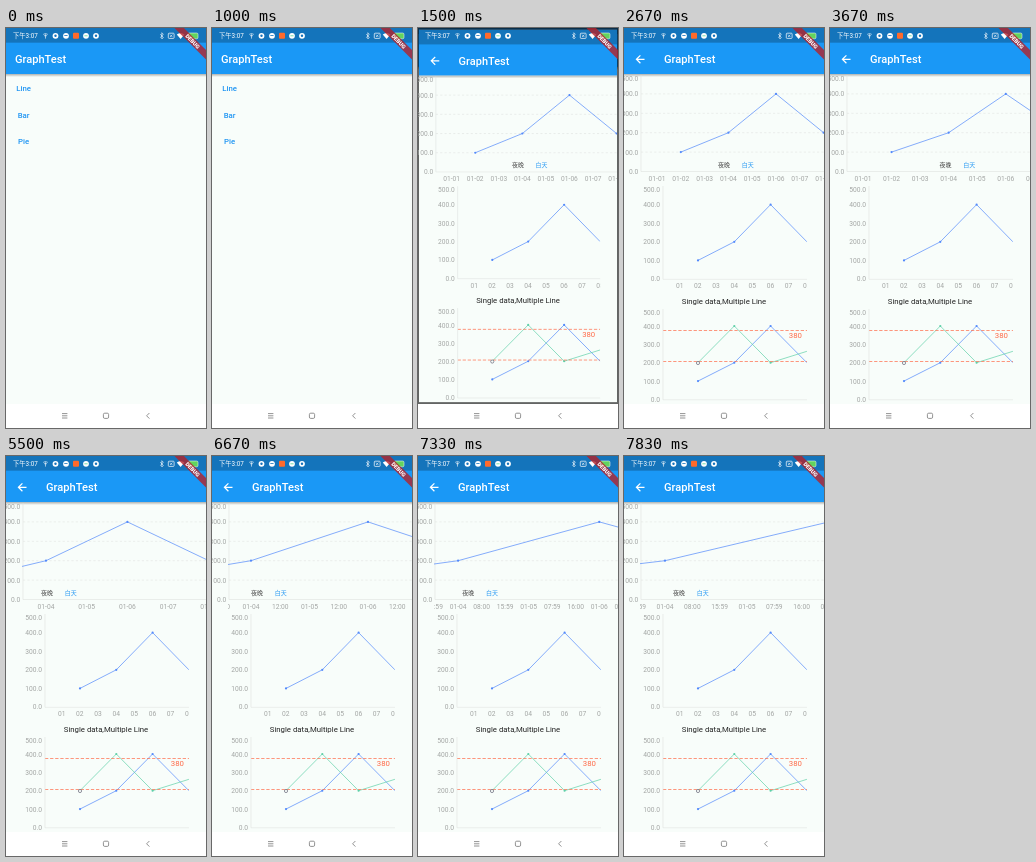
An HTML page for the animation above (8 s loop, 200x400 px).

```html
<!DOCTYPE html>
<html lang="en">
<head>
<meta charset="utf-8">
<title>Chart page</title>
<style>
  html, body { margin: 0; width: 100%; height: 100%; overflow: hidden; background: #fff; }
  svg { display: block; width: 100%; height: 100%; font-family: Roboto, "Noto Sans CJK SC", "Noto Sans CJK", sans-serif; }
</style>
</head>
<body>
<svg id="stage" viewBox="0 0 200 400">
  <defs>
    <clipPath id="screen"><rect width="200" height="376"/></clipPath>
    <clipPath id="scroll"><rect x="16" y="46" width="184" height="110"/></clipPath>
    <clipPath id="plot"><rect x="39" y="150" width="144" height="226"/></clipPath>
    <linearGradient id="shade" x2="0" y2="1">
      <stop stop-color="#000" stop-opacity=".3"/>
      <stop offset="1" stop-color="#000" stop-opacity="0"/>
    </linearGradient>
  </defs>
  <g clip-path="url(#screen)">
    <g id="home"></g>
    <rect id="scrim" width="200" height="376" opacity="0"/>
    <g id="page"></g>
  </g>
  <g id="system"></g>
</svg>
<script>
const $ = id => document.getElementById(id);
const BLUE = '#2196f3', LINE = '#5289fb', GREEN = '#5fd0a8', RED = '#ff6a48', GRAY = '#a3a6a4', RULE = '#dfe3e0';

function add(parent, tag, attrs, text) {
  const el = document.createElementNS('http://www.w3.org/2000/svg', tag);
  for (const k in attrs) el.setAttribute(k, attrs[k]);
  if (text !== undefined) el.textContent = text;
  return parent.appendChild(el);
}
// Text centred vertically on y
const label = (parent, text, x, y, size, fill, anchor = 'middle', weight = 400) =>
  add(parent, 'text', { x, y: y + size * 0.36, 'font-size': size, fill, 'text-anchor': anchor, 'font-weight': weight }, text);
const path = (parent, d, stroke, width = 0.7, more = {}) =>
  add(parent, 'path', { d, stroke, 'stroke-width': width, fill: 'none', ...more });
const dot = (parent, cx, cy, r, fill) => add(parent, 'circle', { cx, cy, r, fill });
const poly = pts => 'M' + pts.map(p => p.join(' ')).join('L');

function scaffold(g, titleX) {
  add(g, 'rect', { width: 200, height: 376, fill: '#f8fdfa' });
  add(g, 'rect', { y: 46, width: 200, height: 3, fill: 'url(#shade)' });
  add(g, 'rect', { width: 200, height: 46, fill: '#1a98f6' });
  add(g, 'rect', { width: 200, height: 14.7, opacity: 0.24 });
  label(g, 'GraphTest', titleX, 31.5, 11.1, '#fff', 'start', 500);
}

function yLabels(g, x, top, base, step) {
  for (let i = 0; i <= 5; i++)
    label(g, (i * 100).toFixed(1), x, Math.max(top, base - i * step), 6.7, GRAY, 'end');
}

function series(g, values, base, step, color) {
  const pts = values.map((v, i) => [74 + i * 36.3, base - v * step / 100]);
  path(g, poly(pts), color);
  pts.slice(0, 3).forEach(p => dot(g, ...p, 1.1, color));
}

// Home page
const home = $('home');
scaffold(home, 8.9);
['Line', 'Bar', 'Pie'].forEach((s, i) => label(home, s, 17.6, 60 + i * 26.7, 7.8, BLUE, 'middle', 500));

// Chart page
const page = $('page');
scaffold(page, 40);
path(page, 'M20.5 31.3H12.6M16.4 27.4L12.4 31.3L16.4 35.2', '#fff', 1.2);

const BASE = 143.5, STEP = 19.4;
yLabels(page, 14.3, 50.5, BASE, STEP);
for (let i = 1; i < 5; i++)
  path(page, `M17 ${BASE - i * STEP}H200`, RULE, 0.6, { 'stroke-dasharray': '2.2 2.2' });
path(page, `M17 47V${BASE}H200`, RULE, 0.6);
const pan = add(page, 'g', { 'clip-path': 'url(#scroll)' });
const curve = path(pan, '', LINE);
const data = [[1, 100], [3, 200], [5, 400], [7, 200]];
const dots = data.map(() => dot(pan, 0, 0, 1.1, LINE));
const ticks = Array.from({ length: 24 }, () => label(pan, '', 0, 150.3, 6.7, GRAY));
const legend = add(pan, 'g', {});
label(legend, '夜晚', 0, 136.6, 6, '#444');
label(legend, '白天', 23.8, 136.6, 6, BLUE);

yLabels(page, 36, 161.7, 251, 18.5);
path(page, 'M39 158V251.3H183', RULE, 0.6);
const plot = add(page, 'g', { 'clip-path': 'url(#plot)' });
for (let i = 1; i <= 8; i++) label(plot, '0' + i, 55.7 + (i - 1) * 18.15, 258, 6.7, GRAY);
series(plot, [100, 200, 400, 200], 251, 18.6, LINE);

label(page, 'Single data,Multiple Line', 100, 273, 7.8, '#222');

yLabels(page, 36, 284.7, 371.6, 18.3);
path(page, 'M39 281V371.8H183', RULE, 0.6);
series(plot, [100, 200, 400, 200], 371.4, 18.35, LINE);
series(plot, [200, 400, 200, 262], 371.4, 18.35, GREEN);
for (const y of [302.5, 333.5])
  path(plot, `M39 ${y}H183`, RED, 0.7, { 'stroke-dasharray': '3.3 1.8' });
add(plot, 'circle', { cx: 74, cy: 335, r: 1.6, fill: '#f8fdfa', stroke: '#667', 'stroke-width': 0.7 });
label(page, '380', 171.4, 307.2, 7.8, RED);

// System bars and debug banner
const sys = $('system');
label(sys, '下午3:07', 7, 7.8, 6.3, '#fff', 'start');
path(sys, 'M37.2 6.4Q39.5 4.6 41.8 6.4M38 7.7H41M39.5 6.2V10.6', '#fff', 0.6);
[49.5, 60, 80, 90].forEach(x => dot(sys, x, 7.8, 2.9, '#fff'));
dot(sys, 49.5, 7.8, 1.2, '#1673bb');
path(sys, 'M58.3 7.5H61.6', '#1673bb', 0.8);
path(sys, 'M78.4 7.8H81.6', '#7da', 1);
dot(sys, 90, 7.8, 1.2, '#1673bb');
add(sys, 'rect', { x: 67, y: 4.8, width: 6, height: 6, rx: 1, fill: '#ff6a2b' });
path(sys, 'M154.3 6L157.3 9.5L155.8 11V4.7L157.3 6.2L154.3 9.7', '#fff', 0.6);
add(sys, 'rect', { x: 162.3, y: 5.2, width: 5.8, height: 5.2, rx: 0.8, fill: 'none', stroke: '#fff', 'stroke-width': 0.7 });
path(sys, 'M164 6.6L166.4 9M166.4 6.6L164 9', '#fff', 0.6);
// Wifi fan
path(sys, 'M170.8 6.6Q174.6 3.4 178.4 6.6L174.6 11Z', 'none', 0, { fill: '#fff' });
add(sys, 'rect', { x: 182, y: 5, width: 10, height: 5.8, rx: 1.4, fill: '#62d45f', stroke: '#fff', 'stroke-width': 0.5 });

const banner = add(sys, 'g', { transform: 'translate(200 0) rotate(45)' });
add(banner, 'rect', { x: -24, y: 15.6, width: 48, height: 6.7, fill: '#b4222a', opacity: 0.8 });
label(banner, 'DEBUG', 0, 18.9, 5.6, '#fff', 'middle', 900);

add(sys, 'rect', { y: 376, width: 200, height: 24, fill: '#fff' });
path(sys, 'M56 385.6H61.4M56 387.8H61.4M56 390H61.4', '#777', 0.8);
add(sys, 'rect', { x: 97.4, y: 385.2, width: 5.2, height: 5.2, rx: 1.3, fill: 'none', stroke: '#777', 'stroke-width': 0.8 });
path(sys, 'M143.4 385L140.6 387.8L143.4 390.6', '#777', 0.8);

// time, x of day 01-04, pixels per day, legend x
const MOVES = [
  [0, 104.4, 23.8, 100],
  [3340, 104.4, 23.8, 100],
  [4500, 155, 40.7, 155],
  [4670, 155, 40.7, 155],
  [5500, 40, 40.7, 41],
  [5840, 39.5, 40.7, 41],
  [6667, 39, 58.5, 45],
  [7000, 39.5, 63, 47],
  [7834, 41, 82, 55],
  [8000, 41, 82, 55]
];

function sample(t) {
  const i = MOVES.findIndex(m => m[0] > t);
  const a = MOVES[i - 1], b = MOVES[i], f = (t - a[0]) / (b[0] - a[0]);
  return a.slice(1).map((v, k) => v + (b[k + 1] - v) * f);
}

function tickText(day, part, parts) {
  if (!part) return '01-0' + (day + 1);
  if (parts === 2) return '12:00';
  return (day < 4 ? ['08:00', '15:59'] : ['07:59', '16:00'])[part - 1];
}

function drawChart(t) {
  const [x3, scale, legendX] = sample(t);
  const at = day => x3 + (day - 3) * scale;
  const pts = data.map(([d, v]) => [at(d), BASE - v * STEP / 100]);
  curve.setAttribute('d', poly(pts));
  dots.forEach((el, i) => { el.setAttribute('cx', pts[i][0]); el.setAttribute('cy', pts[i][1]); });
  const parts = scale < 47 ? 1 : scale < 70 ? 2 : 3;
  ticks.forEach((el, i) => {
    const day = Math.floor(i / parts);
    el.textContent = day < 8 ? tickText(day, i % parts, parts) : '';
    el.setAttribute('x', at(i / parts));
  });
  legend.setAttribute('transform', `translate(${legendX})`);
}

const zoom = (el, s) => el.setAttribute('transform', `translate(100 188) scale(${s}) translate(-100 -188)`);

// Page push: zoom in over a dimmed home page
function drawPush(step) {
  const [scale, alpha, dim] = step < 8 ? [1, 0, 0] : step === 8 ? [0.9, 0.3, 0.2] : step === 9 ? [0.99, 1, 0.6] : [1, 1, 0.6];
  zoom(page, scale);
  zoom(home, step < 8 ? 1 : step === 8 ? 1.01 : 1.05);
  page.setAttribute('opacity', alpha);
  $('scrim').setAttribute('opacity', dim);
}

const TICK = 1000 / 6;
let last = -1, start = performance.now();
function frame() {
  const t = (performance.now() - start) % 8000;
  const step = Math.min(47, Math.floor((t + 4) / TICK));
  if (step !== last) {
    last = step;
    drawPush(step);
    drawChart(step * TICK);
  }
  requestAnimationFrame(frame);
}
frame();
</script>
</body>
</html>
```
